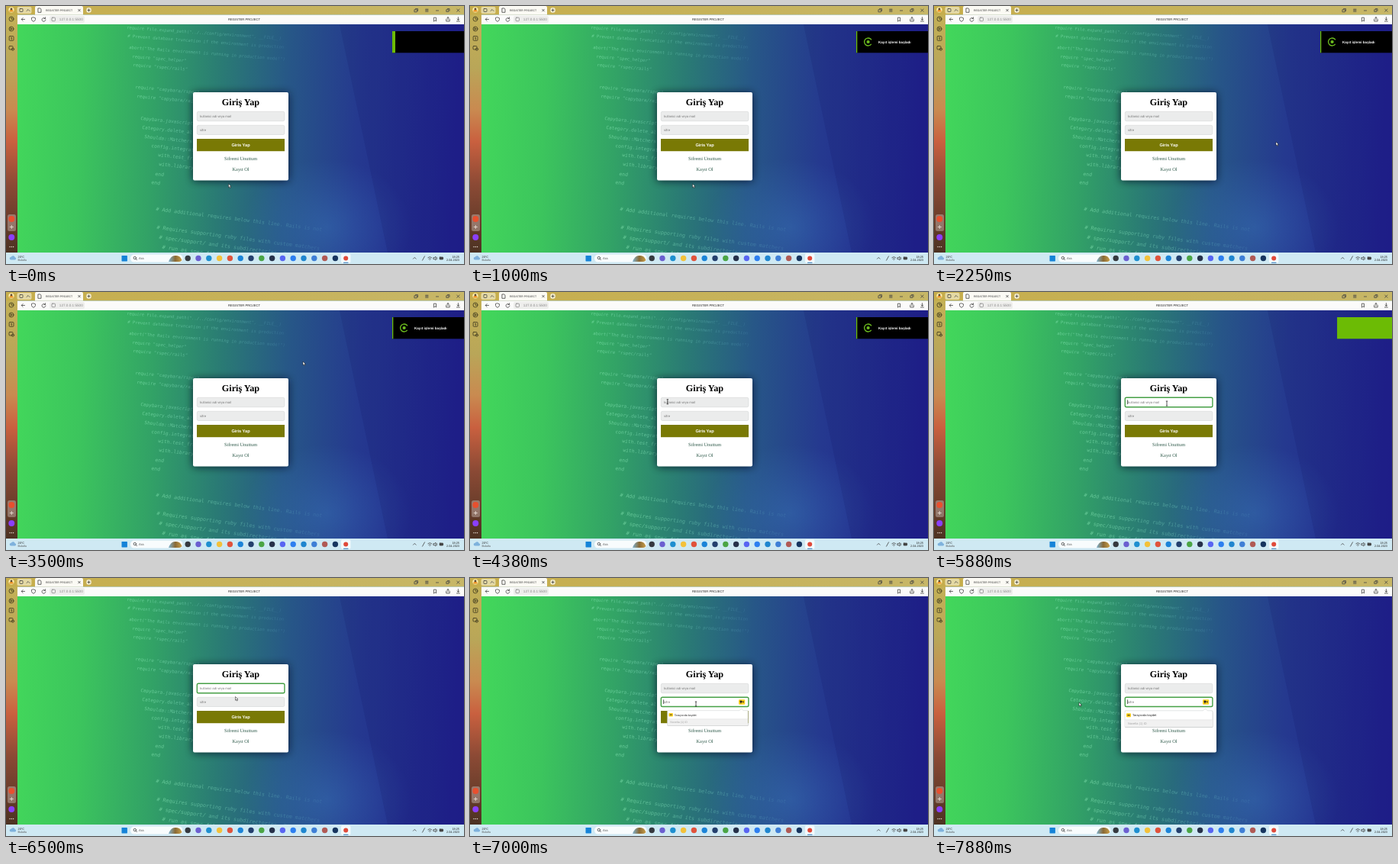
Recreate the animation shown at these times as an HTML page. Size 600x338 px, loop 8000 ms.

```html
<!DOCTYPE html>
<html lang="tr">
<head>
<meta charset="utf-8">
<title>Register Project</title>
<style>
  html, body { margin: 0; width: 100%; height: 100%; overflow: hidden; background: #2a7a70; }
  svg { display: block; width: 100vw; height: 100vh; }
  text { font-family: "Liberation Sans", Arial, sans-serif; text-rendering: geometricPrecision; white-space: pre; }
  .serif { font-family: "Liberation Serif", Times, serif; }
  .code text { font-family: "DejaVu Sans Mono", monospace; fill: url(#ink); }
  .mid { text-anchor: middle; }
  .line { fill: none; stroke: #444; stroke-width: .8; stroke-linecap: round; }
  .side { stroke: #3f3a20; }
  .hint { font-size: 4.25px; fill: #777; }
  .field rect { fill: #ebecec; stroke: #d2d5d5; stroke-width: .6; }
  .field.on rect { fill: #fff; stroke: #46a046; stroke-width: 1.4; }
</style>
</head>
<body>
<svg viewBox="0 0 600 338" preserveAspectRatio="none">
  <defs>
    <linearGradient id="page" gradientUnits="userSpaceOnUse" x1="15" y1="160" x2="600" y2="185">
      <stop offset="0" stop-color="#42d65b"/>
      <stop offset=".14" stop-color="#3cc55d"/>
      <stop offset=".3" stop-color="#32a266"/>
      <stop offset=".45" stop-color="#2a7b74"/>
      <stop offset=".6" stop-color="#275787"/>
      <stop offset=".76" stop-color="#25398f"/>
      <stop offset="1" stop-color="#201f8e"/>
    </linearGradient>
    <linearGradient id="sky" x1="0" y1="0" x2="0" y2="1">
      <stop offset="0" stop-color="#c5b256"/>
      <stop offset=".25" stop-color="#b9a658"/>
      <stop offset=".42" stop-color="#c98a50"/>
      <stop offset=".55" stop-color="#c9603f"/>
      <stop offset=".72" stop-color="#8c4a35"/>
      <stop offset="1" stop-color="#4c3222"/>
    </linearGradient>
    <linearGradient id="bar">
      <stop offset="0" stop-color="#c6ad4b"/>
      <stop offset="1" stop-color="#c7b767"/>
    </linearGradient>
    <linearGradient id="ink" gradientUnits="userSpaceOnUse" x1="0" y1="0" x2="250" y2="0">
      <stop offset="0" stop-color="#8cecb8" stop-opacity=".6"/>
      <stop offset=".5" stop-color="#74cfc0" stop-opacity=".45"/>
      <stop offset="1" stop-color="#5a9ad0" stop-opacity=".12"/>
    </linearGradient>
    <radialGradient id="glow">
      <stop offset="0" stop-color="#3c7cc0" stop-opacity=".4"/>
      <stop offset="1" stop-color="#3c7cc0" stop-opacity="0"/>
    </radialGradient>
    <linearGradient id="scene">
      <stop offset="0" stop-color="#7fb3d0"/>
      <stop offset=".5" stop-color="#8a6a35"/>
      <stop offset="1" stop-color="#c9a04a"/>
    </linearGradient>
    <filter id="shade" x="-30%" y="-30%" width="160%" height="160%"><feGaussianBlur stdDeviation="5.5"/></filter>
    <filter id="soft"><feGaussianBlur stdDeviation=".3"/></filter>
    <clipPath id="view"><rect x="15" y="24" width="585" height="299"/></clipPath>
  </defs>

  <!-- page -->
  <g clip-path="url(#view)">
    <rect x="15" y="24" width="585" height="299" fill="url(#page)"/>
    <ellipse cx="420" cy="290" rx="110" ry="90" fill="url(#glow)"/>
    <path d="M437 24H600V323H500Z" fill="#14105c" opacity=".14"/>
    <g class="code" id="code" filter="url(#soft)"></g>
  </g>

  <!-- sidebar -->
  <rect width="15" height="323" fill="url(#sky)"/>
  <g class="line side">
    <circle cx="7" cy="17" r="3"/><path d="M7 15.3V17.2H8.4"/>
    <circle cx="7" cy="30" r="3"/><path d="M6.3 28.7L8.4 30L6.3 31.3Z"/>
    <rect x="4.2" y="39.5" width="5.8" height="5.8" rx="1"/><path d="M6.6 41.6L7.3 41V44"/>
    <rect x="4" y="52.5" width="5" height="4.5" rx="1"/><circle cx="9" cy="56.6" r="1.6"/>
  </g>
  <rect x="2" y="273" width="11" height="22" rx="2.5" fill="#fff" opacity=".3"/>
  <circle cx="7.3" cy="279" r="4" fill="#e8502f"/>
  <path class="line" style="stroke:#f1e6df" d="M5.2 289.5H9.4M7.3 287.4V291.6"/>
  <circle cx="7.3" cy="303" r="4" fill="#8a3ffc"/>
  <g fill="#eadfd6"><circle cx="5" cy="315.5" r=".7"/><circle cx="7.3" cy="315.5" r=".7"/><circle cx="9.6" cy="315.5" r=".7"/></g>

  <!-- tab strip -->
  <rect width="600" height="11.5" fill="url(#bar)"/>
  <circle cx="7" cy="5" r="3.6" fill="#fff0b0"/><circle cx="7" cy="4" r="1.5" fill="#5a4630"/><path d="M4.3 7.4a2.7 2.4 0 0 1 5.4 0Z" fill="#e58a1e"/>
  <rect x="14.5" y="1" width="19" height="9" rx="2" fill="#e4d9a4"/>
  <rect class="line" x="18" y="3.5" width="4" height="4" rx=".6"/><path class="line" d="M27 6.5L29 4.5L31 6.5"/>
  <path d="M38 11.5V2a2 2 0 0 1 2-2H99a2 2 0 0 1 2 2V11.5Z" fill="#fbfaf4"/>
  <path class="line" d="M42.3 3H44.8L46 4.2V8.3H42.3Z"/>
  <text x="52" y="7.2" font-size="3.5" fill="#333">REGISTER PROJECT</text>
  <path class="line" d="M94.7 4.3L97.3 6.9M97.3 4.3L94.7 6.9"/>
  <circle cx="108.5" cy="5.5" r="3.4" fill="#efe8c8"/><path class="line" d="M107 5.5H110M108.5 4V7"/>
  <g class="line">
    <path d="M536.5 3.6H539.5V6.6M535.3 4.8H538.3V7.8H535.3Z"/>
    <path d="M549.6 4.2H553M549.6 5.7H553M549.6 7.2H553"/>
    <path d="M563.4 6H566.6"/>
    <path d="M578.3 3.6H581V6.3M577.2 4.8H579.9V7.4H577.2Z"/>
    <path d="M590.7 4L594 7.3M594 4L590.7 7.3"/>
  </g>

  <!-- address bar -->
  <rect x="15" y="11.5" width="585" height="12.5" fill="#fbfbfa"/>
  <rect x="57" y="13" width="46" height="9" rx="2" fill="#eeeeec"/>
  <g class="line">
    <path d="M24.5 17.5H20.3M22.1 15.6L20.2 17.5L22.1 19.4"/>
    <path d="M36 14.9L38.5 15.8V17.6Q38.2 19.5 36 20.4Q33.8 19.5 33.5 17.6V15.8Z"/>
    <path d="M51.2 16.2A2.4 2.4 0 1 0 51.9 18M51.6 14.8V16.5H49.9"/>
    <rect x="60" y="15.2" width="4.5" height="4.5" rx="1" stroke="#888"/>
    <path d="M560.7 15.2H563.5V20L562.1 18.7L560.7 20Z"/>
    <path d="M576.7 17.2V20H581.2V17.2M579 18.2V14.6M577.7 15.8L579 14.6L580.3 15.8"/>
    <path d="M592.4 14.6V18.4M591 17.1L592.4 18.4L593.8 17.1M590.4 20H594.4"/>
  </g>
  <text x="69.8" y="19.2" font-size="4.65" fill="#888">127.0.0.1:5500</text>
  <text class="mid" x="312" y="19.1" font-size="4.2" fill="#222">REGISTER PROJECT</text>

  <!-- login card -->
  <rect x="245" y="114" width="125" height="115" fill="#04101c" opacity=".75" filter="url(#shade)"/>
  <rect x="245" y="113" width="125" height="115.5" rx="2" fill="#fff"/>
  <text class="serif mid" x="307.5" y="130" font-size="12.2" font-weight="700">Giriş Yap</text>
  <g class="field" id="user">
    <rect x="250.3" y="138.3" width="114.6" height="12.4" rx="1.8"/>
    <text class="hint" x="254" y="145.8">kullanici adi veya mail</text>
  </g>
  <g class="field" id="pass">
    <rect x="250.3" y="156.3" width="114.6" height="12.2" rx="1.8"/>
    <text class="hint" x="254" y="163.8">sifre</text>
  </g>
  <rect x="250" y="174" width="115" height="16.2" fill="#797905"/>
  <text class="mid" x="307.5" y="184" font-size="5.6" font-weight="700" fill="#fff">Giris Yap</text>
  <g class="serif mid" fill="#2c5848" font-size="6.35">
    <text class="serif" x="307.5" y="202.2">Sifremi Unuttum</text>
    <text class="serif" x="307.5" y="215.6">Kayıt Ol</text>
  </g>
  <rect id="caret" x="253.4" width=".7" height="5.6" fill="#111"/>
  <g id="key">
    <rect x="352" y="159.3" width="8.2" height="6.4" rx="1" fill="#ffd21f"/>
    <circle cx="354.9" cy="162" r="1.4" fill="#222"/><path d="M355.5 162H359M358 162V163.5M354.9 162V164.6" stroke="#222" stroke-width=".8"/>
  </g>
  <g id="popup">
    <rect x="250" y="174.6" width="115.4" height="21.4" rx="1.5" fill="#000" opacity=".22"/>
    <path d="M251 173.8H352.6L355.4 171L358.2 173.8H364Q365 173.8 365 174.8V194.2Q365 195.2 364 195.2H251Q250 195.2 250 194.2V174.8Q250 173.8 251 173.8Z" fill="#fff" stroke="#c4c8c8" stroke-width=".5"/>
    <path d="M250.3 186H364.7V194Q364.7 195 363.7 195H251.3Q250.3 195 250.3 194Z" fill="#f1f1f1"/>
    <path d="M250.3 185.8H364.7" stroke="#d9d9d9" stroke-width=".5"/>
    <rect x="252" y="177.3" width="6" height="5" rx="1" fill="#ffd21f"/><path d="M253.5 179.8H256.6" stroke="#222" stroke-width="1"/>
    <text x="260" y="181.4" font-size="4" fill="#222">Tarayıcıda kaydet</text>
    <text x="254" y="191.8" font-size="4" fill="#a5a5a5">Novelta (1) ID</text>
  </g>

  <!-- toast -->
  <g id="toast">
    <rect id="panel" x="506" y="33" width="94" height="28.3" fill="#000"/>
    <g id="note">
      <circle cx="521.6" cy="47" r="5" fill="none" stroke="#6cbc1e" stroke-width="1.3" stroke-dasharray="25 6.4" transform="rotate(35 521.6 47)"/>
      <circle cx="521.6" cy="47" r="2.1" fill="#6cbc1e"/>
      <text x="535" y="48.8" font-size="4.6" font-weight="700" fill="#fff">Kayıt işlemi başladı</text>
    </g>
    <rect id="cover" y="33" height="28.3" fill="#6cbb05"/>
  </g>

  <!-- taskbar -->
  <rect y="323" width="600" height="15" fill="#cfe9f3"/>
  <path d="M6.5 332.6a1.9 1.9 0 0 1 .3-3.8a2.6 2.6 0 0 1 4.9.5a1.7 1.7 0 0 1 .3 3.3Z" fill="#7fb2dc"/>
  <text x="15.6" y="329.6" font-size="3.8" fill="#222">20°C</text>
  <text x="15.6" y="334.4" font-size="3.8" fill="#555">Bulutlu</text>
  <rect x="151.5" y="327" width="7.4" height="7.4" rx=".6" fill="#1583d8"/>
  <rect x="163" y="325.6" width="68.5" height="10" rx="5" fill="#f8fcfd"/>
  <g class="line"><circle cx="168.8" cy="330" r="1.7"/><path d="M170.1 331.3L171.4 332.7"/></g>
  <text x="174" y="332.2" font-size="4.2" fill="#555">Ara</text>
  <path d="M213 335Q216 326.5 222 327Q228 326 230.5 333Q229 335 227 335Z" fill="url(#scene)"/>
  <rect x="439" y="324.6" width="12.4" height="12" rx="1.5" fill="#f3fafc"/>
  <g id="dock"></g>
  <rect x="442" y="335.8" width="6.5" height="1" rx=".5" fill="#2d74b8"/>
  <g class="line">
    <path d="M533.5 331.2L535.3 329.4L537.1 331.2"/>
    <path d="M545.5 333.2L548.5 327.8"/>
    <path d="M552.8 329.6Q555.2 327.4 557.6 329.6M553.9 331.2Q555.2 330 556.5 331.2M555.2 332.7V332.8"/>
    <path d="M560.2 329.6H561.3L562.9 328.2V333L561.3 331.6H560.2ZM564.3 329.3Q565 330.6 564.3 331.9"/>
    <rect x="568" y="329" width="4.6" height="3" rx=".6" fill="#444"/>
  </g>
  <g text-anchor="end" font-size="3.8" fill="#222"><text x="594" y="329.6">18:25</text><text x="594" y="334.4">2.04.2023</text></g>

  <path id="arrow" d="M0 0V4.7L1.1 3.7L1.9 5.5L2.8 5.1L2 3.4H3.5Z" fill="#fff" stroke="#111" stroke-width=".5"/>
  <path id="beam" d="M-1.2 -3H1.2M0 -3V3M-1.2 3H1.2" fill="none" stroke="#222" stroke-width=".75"/>
</svg>
<script>
const LOOP = 8000, STEP = 125;
const $ = id => document.getElementById(id);
const set = (id, attrs) => { for (const k in attrs) $(id).setAttribute(k, attrs[k]); };
const show = (id, on) => { $(id).style.display = on ? '' : 'none'; };
const ramp = (t, a, b) => Math.min(1, Math.max(0, (t - a) / (b - a)));
const mix = (a, b, p) => a + (b - a) * p;

function add(parent, tag, attrs, text = '') {
  const el = document.createElementNS('http://www.w3.org/2000/svg', tag);
  for (const k in attrs) el.setAttribute(k, attrs[k]);
  el.textContent = text;
  $(parent).append(el);
}

// x, baseline, text; tilt and size grow down the page
const lines = [
  [158, 30, 'require File.expand_path("../../config/environment", __FILE__)'],
  [159, 41, '# Prevent database truncation if the environment is production'],
  [161, 56, 'abort("The Rails environment is running in production mode!")'],
  [165, 68, 'require "spec_helper"'],
  [166, 79, 'require "rspec/rails"'],
  [169, 108, 'require "capybara/rspec"'],
  [171, 120, 'require "capybara/rails"'],
  [176, 149, 'Capybara.javascript_driver = :webkit'],
  [178, 161, 'Category.delete_all; Category.create'],
  [181, 173, 'Shoulda::Matchers.configure do |config|'],
  [190, 185, 'config.integrate do |with|'],
  [199, 197, 'with.test_framework :rspec'],
  [200, 209, 'with.library :rails'],
  [195, 222, 'end'],
  [190, 233, 'end'],
  [196, 268, '# Add additional requires below this line. Rails is not'],
  [197, 292, '# Requires supporting ruby files with custom matchers'],
  [200, 305, '# spec/support/ and its subdirectories. Files matching'],
  [204, 318, '# run as spec files by default. This means that files']
];
for (const [x, y, text] of lines)
  add('code', 'text', {
    transform: `translate(${x} ${y}) rotate(${3.6 + y * .013}) skewX(-6)`,
    'font-size': 5.3 + y * .005
  }, text);

const dock = ['#35393f', '#6b5fd0', '#1e8fd0', '#f3c13a', '#e0533c', '#1b84d8', '#24406e', '#4aa545',
  '#26314a', '#5865f2', '#2d7ff0', '#1f86cf', '#3f7fd6', '#b05a55', '#17355f', '#e04a3a'];
dock.forEach((fill, i) => add('dock', 'circle', { cx: 238.2 + 13.8 * i, cy: 330.5, r: i === 15 ? 3 : 3.7, fill }));

// pointer path: time, x, y
const path = [
  [0, 291.5, 233], [1125, 291.5, 233], [1500, 330, 222], [2000, 440, 184], [2250, 448, 178],
  [2875, 424, 117], [3375, 395, 93], [3500, 389, 91], [3750, 378, 96], [4000, 350, 112],
  [4625, 198, 165], [4750, 206, 176], [5000, 272, 180], [5250, 330, 152], [5500, 318, 150],
  [5625, 305, 146], [6375, 305, 146], [6625, 296, 165], [7625, 296, 165], [7750, 245, 166], [7875, 190, 163]
];
function pointer(t) {
  let i = 1;
  while (i < path.length - 1 && path[i][0] < t) i++;
  const [a, b] = [path[i - 1], path[i]], p = ramp(t, a[0], b[0]);
  return [mix(a[1], b[1], p), mix(a[2], b[2], p)];
}

const USER_AT = 5750, PASS_AT = 6875;

function draw(t) {
  // toast: strip thins out, message fades in; later the strip covers it and slides away
  const grow = ramp(t, 5500, 5740), leave = ramp(t, 5750, 6290) ** .99;
  const left = mix(506, 600, leave);
  show('toast', leave < 1);
  show('panel', grow < 1);
  show('note', grow < 1);
  $('note').style.opacity = ramp(t, 60, 560);
  const strip = mix(4, 1.3, ramp(t, 0, 250));
  set('cover', { x: left, width: Math.min(600 - left, mix(strip, 94, grow)) });

  const onPass = t >= PASS_AT, onUser = t >= USER_AT && !onPass;
  $('user').classList.toggle('on', onUser);
  $('pass').classList.toggle('on', onPass);
  const since = t - (onPass ? PASS_AT : USER_AT);
  show('caret', since >= 0 && since % 1000 < 500);
  set('caret', { y: onPass ? 159.4 : 141.4 });

  show('key', onPass);
  show('popup', onPass);
  const s = mix(.84, 1, ramp(t, PASS_AT, PASS_AT + 250));
  set('popup', { transform: `translate(357 172) scale(${s}) translate(-357 -172)` });

  const [x, y] = pointer(t);
  const typing = x > 250 && x < 365 && (y > 138 && y < 151 || y > 156 && y < 169);
  show('beam', typing);
  show('arrow', !typing);
  set(typing ? 'beam' : 'arrow', { transform: `translate(${x} ${y})` });
}

const start = performance.now();
function tick() {
  const t = (performance.now() - start) % LOOP;
  draw(Math.floor(t / STEP) * STEP);
  requestAnimationFrame(tick);
}
tick();
</script>
</body>
</html>
```
